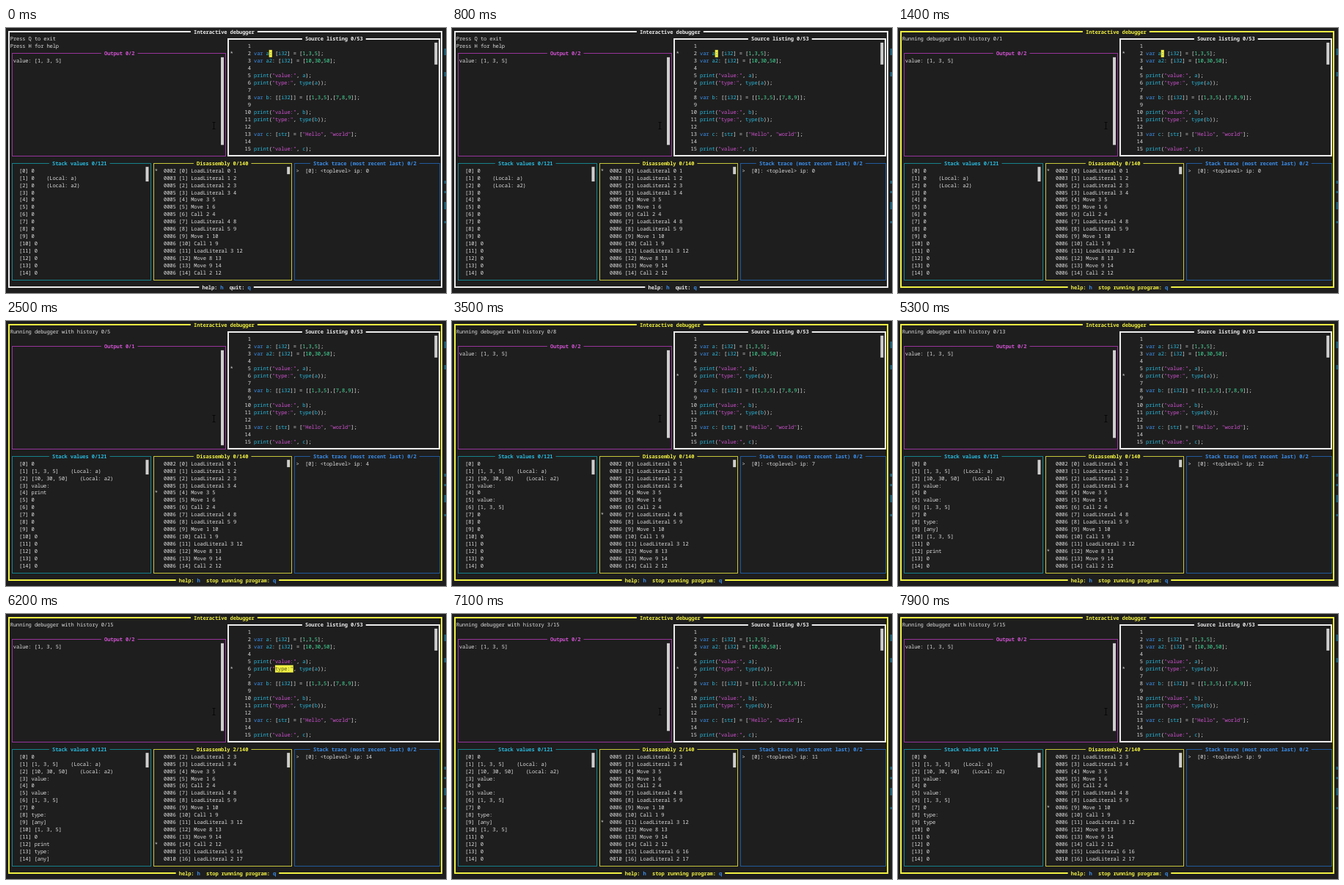
An HTML page with a canvas that plays this animation: 600x361 px, repeating every 8 s.

```html
<!DOCTYPE html>
<html>
<head>
<meta charset="utf-8">
<title>Interactive debugger</title>
<style>
html, body { margin: 0; width: 600px; height: 361px; overflow: hidden; background: #1e1e1e; }
canvas { display: block; width: 600px; height: 361px; }
</style>
</head>
<body>
<canvas id="stage" width="600" height="361"></canvas>
<script>
const ctx = document.getElementById('stage').getContext('2d');
const LOOP = 8000, CELL = 4.135, ROW = 9.955, VIEW = 15;
const BG = '#1e1e1e', TEXT = '#dedede', WHITE = '#ececec', YELLOW = '#f0f043',
  CYAN = '#29b8db', SKY = '#3b8eea', GREEN = '#3fe09a', PINK = '#cf52cf';

const SOURCE = [
  '', 'var a: [i32] = [1,3,5];', 'var a2: [i32] = [10,30,50];', '',
  'print("value:", a);', 'print("type:", type(a));', '',
  'var b: [[i32]] = [[1,3,5],[7,8,9]];', '',
  'print("value:", b);', 'print("type:", type(b));', '',
  'var c: [str] = ["Hello", "world"];', '', 'print("value:", c);'
];

// source line, operation, operands
const CODE = [
  [2, 'L', 0, 1], [3, 'L', 1, 2], [5, 'L', 2, 3], [5, 'L', 3, 4], [5, 'M', 3, 5],
  [5, 'M', 1, 6], [5, 'C', 2, 4], [6, 'L', 4, 8], [6, 'L', 5, 9], [6, 'M', 1, 10],
  [6, 'C', 1, 9], [6, 'L', 3, 12], [6, 'M', 8, 13], [6, 'M', 9, 14], [6, 'C', 2, 12],
  [8, 'L', 6, 16], [10, 'L', 2, 17]
];
const OPS = { L: 'LoadLiteral', M: 'Move', C: 'Call' };
const LITERALS = ['[1, 3, 5]', '[10, 30, 50]', 'value:', 'print', 'type:', 'type'];
const LOCALS = { 1: 'a', 2: 'a2' };
// instruction -> highlighted columns [start, length]
const MARKS = { 0: [5, 1], 1: [6, 1], 6: [7, 7], 14: [7, 6] };

const START = 1100;
const STEPS = [1600, 1900, 2200, 2500, 2800, 3200, 3500, 3800, 4100, 4400, 4800, 5100, 5500, 5800];
const BACKS = [6500, 6800, 7100, 7400, 7700];

const passed = (times, t) => times.filter(x => t >= x).length;
const rowY = r => 5 + ROW * r;

function stackAt(ip) {
  const regs = Array(VIEW).fill('0');
  CODE.slice(0, ip).forEach(([, op, a, b]) => {
    if (op === 'L') regs[b] = LITERALS[a];
    else if (op === 'M') regs[b] = regs[a];
    else regs[b] = a === 1 ? '[any]' : '0';
  });
  return regs;
}

function put(s, x, row, color = TEXT, bold = false) {
  ctx.font = (bold ? 'bold' : '500') + ' 7.1px "Noto Sans Mono", "DejaVu Sans Mono", monospace';
  ctx.fillStyle = color;
  const y = rowY(row) + 2.5;
  [...s].forEach((ch, i) => {
    if (ch !== ' ') ctx.fillText(ch, x + i * CELL, y);
  });
}

function bar(x, row, rows) {
  ctx.fillStyle = '#cfcfcf';
  ctx.fillRect(x, rowY(row) - ROW / 2, 4, rows * ROW);
}

// Snap borders so they stay crisp at either line width.
function box(x0, x1, r0, r1, color, width) {
  const snap = v => width > 1 ? Math.round(v) : Math.floor(v) + 0.5;
  const x = snap(x0), y = snap(rowY(r0));
  ctx.strokeStyle = color;
  ctx.lineWidth = width;
  ctx.strokeRect(x, y, snap(x1) - x, snap(rowY(r1)) - y);
}

function gap(x, n, row) {
  ctx.fillStyle = BG;
  ctx.fillRect(x - CELL, rowY(row) - 4, (n + 2) * CELL, 8);
}

function panel(x0, x1, r0, r1, edge, width, title, tx, color) {
  box(x0, x1, r0, r1, edge, width);
  gap(tx, title.length, r0);
  put(title, tx, r0, color, true);
}

function sourceLine(line, x, row) {
  for (const m of line.matchAll(/"[^"]*"|\d+|\w+|./g)) {
    const s = m[0];
    let color = TEXT;
    if (s[0] === '"') color = PINK;
    else if (s === 'var') color = SKY;
    else if (/^\d/.test(s)) color = GREEN;
    else if (/^\w/.test(s)) color = CYAN;
    put(s, x + m.index * CELL, row, color);
  }
}

function drawSource(ip) {
  panel(303, 591, 1, 17, WHITE, 2, 'Source listing 0/53', 408, WHITE);
  const x = 338, current = CODE[ip][0], mark = MARKS[ip];
  SOURCE.forEach((line, i) => {
    const row = i + 2, n = i + 1;
    put(String(n).padStart(2), x - 3 * CELL, row);
    if (n === current) put('*', 305.4, row);
    sourceLine(line, x, row);
    if (n === current && mark) {
      const mx = x + mark[0] * CELL;
      ctx.fillStyle = YELLOW;
      ctx.fillRect(mx, rowY(row) - 5, mark[1] * CELL, ROW);
      put(line.substr(mark[0], mark[1]), mx, row, '#55551e');
    }
  });
  bar(584.3, 2, 3);
}

function drawOutput(lines) {
  panel(8, 299, 3, 17, '#96339a', 1, 'Output 0/' + (lines.length + 1), 134, PINK);
  lines.forEach((s, i) => put(s, 9.8, 4 + i));
  bar(293, 4, 13 - lines.length);
}

function drawStack(ip) {
  panel(8, 197, 18, 34, '#16808c', 1, 'Stack values 0/121', 63, CYAN);
  stackAt(ip).forEach((value, i) => {
    const local = LOCALS[i] ? `    (Local: ${LOCALS[i]})` : '';
    put(`[${i}] ${value}${local}`, 18, 19 + i);
  });
  bar(190.5, 19, 2);
}

function drawCode(ip, scroll) {
  panel(201, 389, 18, 34, '#c6c63c', 1, `Disassembly ${scroll}/140`, 260, YELLOW);
  CODE.slice(scroll, scroll + VIEW).forEach(([line, op, a, b], i) => {
    const n = i + scroll;
    put(`${String(line).padStart(4, '0')} [${n}] ${OPS[op]} ${a} ${b}`, 215, 19 + i);
    if (n === ip) put('*', 202.8, 19 + i);
  });
  bar(383.2, 19, scroll > 1 ? 2 : 1);
}

function drawTrace(ip) {
  panel(393.5, 591, 18, 34, '#225a9c', 1, 'Stack trace (most recent last) 0/2', 419, SKY);
  put('>  [0]: <toplevel> ip: ' + ip, 395.6, 19);
}

function drawFrame(running) {
  const color = running ? YELLOW : WHITE;
  box(4, 594, 0, 35, color, 2);
  const title = 'Interactive debugger';
  gap(256, title.length, 0);
  put(title, 256, 0, color, true);

  const stop = running ? 'stop running program: ' : 'quit: ';
  const help = 'help: h  ' + stop + 'q';
  const x = running ? 235.8 : 267.5;
  gap(x, help.length, 35);
  put('help:', x, 35, color, true);
  put('h', x + 6 * CELL, 35, SKY, true);
  put(stop, x + 9 * CELL, 35, color, true);
  put('q', x + (help.length - 1) * CELL, 35, SKY, true);
}

function drawEdge() {
  ctx.fillStyle = '#1d5f78';
  [[28, 9], [60, 6], [208, 4], [222, 3], [237, 10], [263, 3]]
    .forEach(([y, h]) => ctx.fillRect(597.5, y, 2.5, h));
}

function drawPointer() {
  ctx.strokeStyle = '#080808';
  ctx.lineWidth = 1;
  ctx.beginPath();
  [128.5, 137.5].forEach(y => {
    ctx.moveTo(281.5, y);
    ctx.lineTo(285.5, y);
  });
  ctx.moveTo(283.5, 128.5);
  ctx.lineTo(283.5, 137.5);
  ctx.stroke();
}

function draw(t) {
  const running = t >= START;
  const top = passed(STEPS, t), back = passed(BACKS, t);
  const ip = top - back;
  const printed = top === 0 || ip > 6;

  ctx.fillStyle = BG;
  ctx.fillRect(0, 0, 600, 361);
  drawEdge();
  drawFrame(running);
  if (running) {
    put(`Running debugger with history ${back}/${top + 1}`, 5.8, 1);
  } else {
    put('Press Q to exit', 5.8, 1);
    put('Press H for help', 5.8, 2);
  }
  drawOutput(printed ? ['value: [1, 3, 5]'] : []);
  drawSource(ip);
  drawStack(ip);
  drawCode(ip, Math.max(0, top - 12));
  drawTrace(ip);
  drawPointer();
}

ctx.textRendering = 'geometricPrecision';
const origin = performance.now();
function tick() {
  draw((performance.now() - origin) % LOOP);
  requestAnimationFrame(tick);
}
draw(0);
requestAnimationFrame(tick);
</script>
</body>
</html>
```
